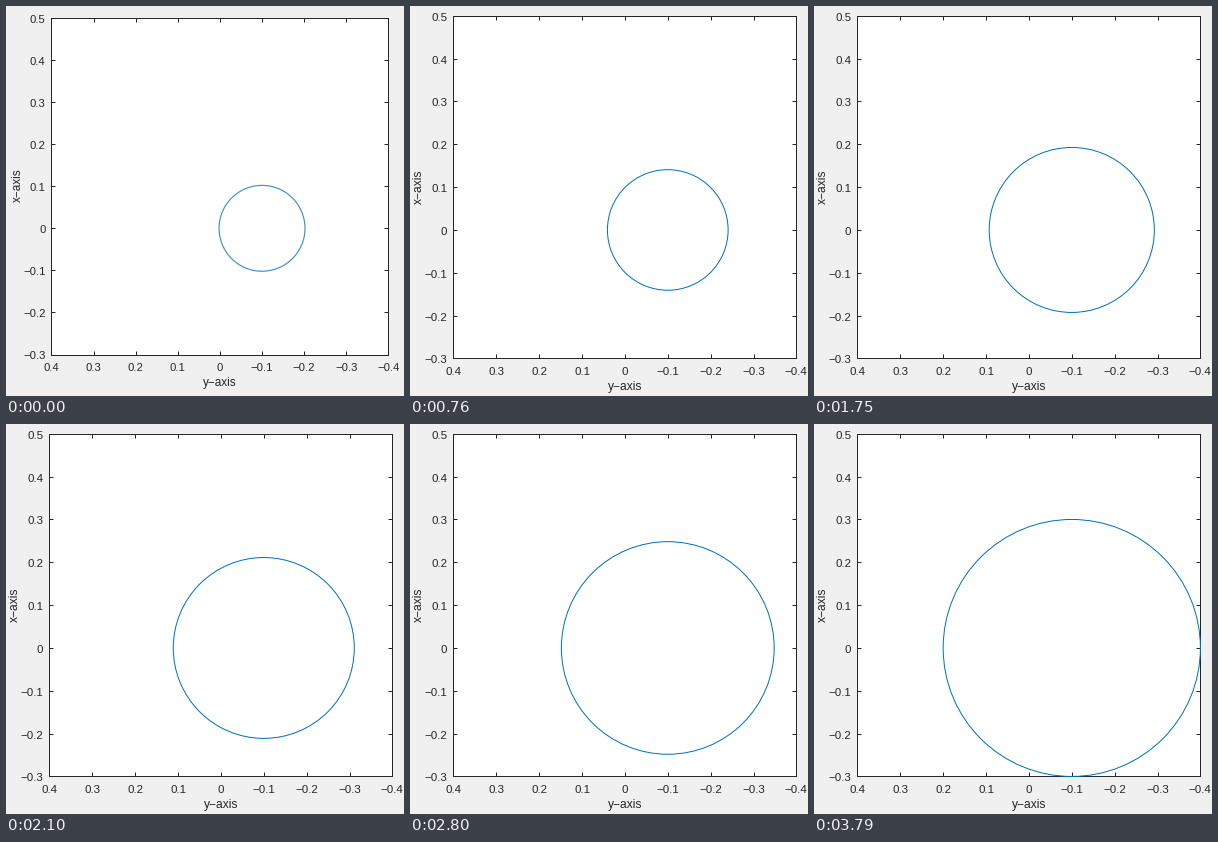
A matplotlib script that plays this animation: 398 by 390 pixels, repeating every 4250 ms.

```python
import numpy as np
import matplotlib.pyplot as plt
from matplotlib.animation import FuncAnimation
from matplotlib.patches import Ellipse, Rectangle

W, H, DPI = 398, 390, 100
PX = 72 / DPI                      # one pixel in points
LEFT, RIGHT, TOP, BOTTOM = 43.4, 386.4, 9.8, 352.45
UNIT_X, UNIT_Y = (RIGHT - LEFT) / 0.8, (BOTTOM - TOP) / 0.8
INK, BLUE = "#262626", "#0072bd"
TICK = 4
TICK_SIZE, LABEL_SIZE = 11.5, 12

# The first pose shows the whole plot slightly smaller and shifted.
SHRINK = 337 / 343
SHRUNK_LEFT, SHRUNK_TOP = 45.4, 11.9

# Hold of each radius step, in units of 10 ms
STEPS = 54
holds = np.full(STEPS, 7)
holds[4] = 6
holds[[16, 44]] = 8
starts = np.cumsum(holds)

plt.rcParams["font.family"] = "Liberation Sans"
fig = plt.figure(figsize=(W / DPI, H / DPI), dpi=DPI, facecolor="#f0f0f0")
ax = fig.add_axes([0, 0, 1, 1])
ax.axis("off")
texts = []


def to_x(v):
    return LEFT + (0.4 - v) * UNIT_X


def to_y(v):
    return TOP + (0.5 - v) * UNIT_Y


def add_text(x, y, s, size, **kw):
    kw = {"ha": "center", "va": "baseline", **kw}
    texts.append((ax.text(x, y, s, color=INK, fontsize=size * PX, **kw), size))


def tick_name(n):
    return "0" if n == 0 else f"{n / 10:.1f}".replace("-", "\u2212")


def add_ticks():
    xs, ys = [], []

    def segment(x0, y0, x1, y1):
        xs.extend([x0, x1, np.nan])
        ys.extend([y0, y1, np.nan])

    for n in range(-4, 5):
        x = to_x(n / 10)
        segment(x, TOP, x, TOP + TICK)
        segment(x, BOTTOM, x, BOTTOM - TICK)
        add_text(x, 369, tick_name(n), TICK_SIZE)
    for n in range(-3, 6):
        y = to_y(n / 10)
        segment(LEFT, y, LEFT + TICK, y)
        segment(RIGHT, y, RIGHT - TICK, y)
        add_text(37.4, y + 4.9, tick_name(n), TICK_SIZE, ha="right")
    ax.plot(xs, ys, color=INK, lw=PX, snap=True, solid_capstyle="butt")


ax.add_patch(Rectangle((LEFT, TOP), RIGHT - LEFT, BOTTOM - TOP, fc="white",
                       ec=INK, lw=PX, snap=True))
add_ticks()
add_text(214.8, 384, "y\u2212axis", LABEL_SIZE)
add_text(12, 180.5, "x\u2212axis", LABEL_SIZE, rotation=90,
         rotation_mode="anchor")
circle = Ellipse((to_x(-0.1), to_y(0)), 1, 1, fill=False, ec=BLUE, lw=PX,
                 zorder=4)
ax.add_patch(circle)


def set_view(shrunk):
    scale = SHRINK if shrunk else 1
    x0 = LEFT - SHRUNK_LEFT / SHRINK if shrunk else 0
    y0 = TOP - SHRUNK_TOP / SHRINK if shrunk else 0
    ax.set_xlim(x0, x0 + W / scale)
    ax.set_ylim(y0 + H / scale, y0)
    for text, size in texts:
        text.set_fontsize(size * scale * PX)
    circle.set_alpha(0.75 if shrunk else 1)
    circle.set_linewidth((1.2 if shrunk else 1) * PX)


def update(i):
    step = np.searchsorted(starts, i, side="right")
    radius = max(0.102, 0.1 + 0.2 * step / STEPS)
    set_view(step == 0)
    circle.set_width(2 * radius * UNIT_X)
    circle.set_height(2 * radius * UNIT_Y)
    return [circle]


anim = FuncAnimation(fig, update, frames=425, interval=10, repeat=True,
                     repeat_delay=0, blit=False)
plt.show()
```
